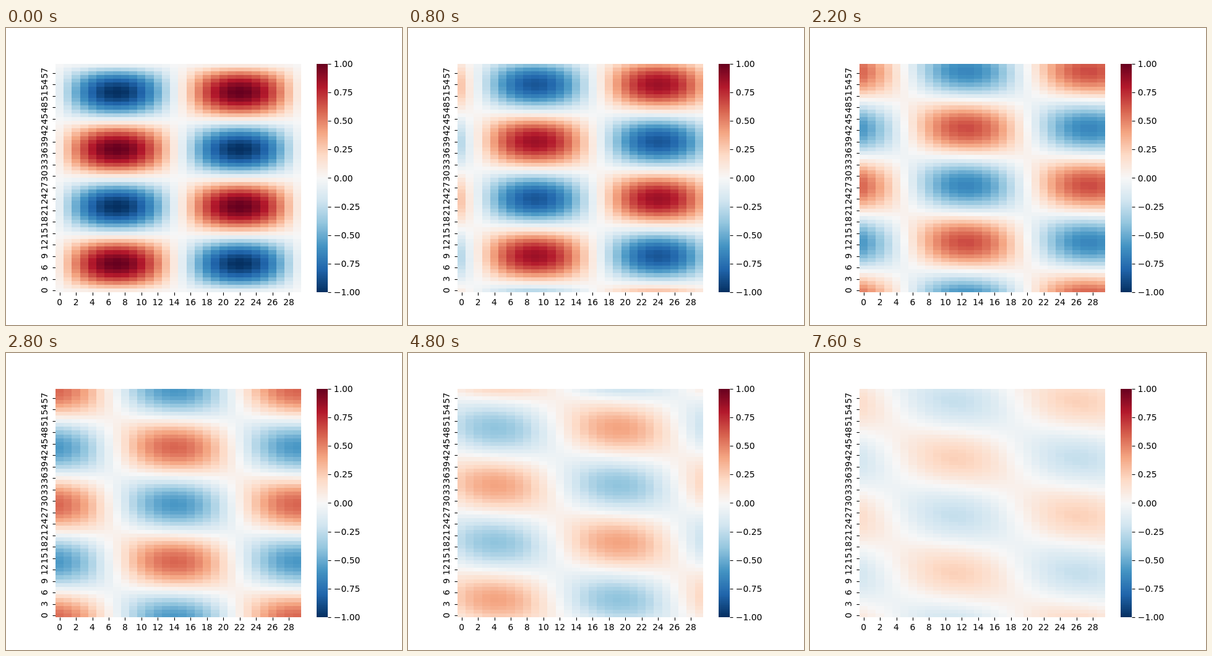
Write an HTML page with a canvas that moves like this. It is 640 px wide and 480 px high and loops after 8 s.

```html
<!DOCTYPE html>
<html lang="en">
<head>
<meta charset="utf-8">
<title>Advected wave heatmap</title>
<style>
html, body { margin: 0; width: 100%; height: 100%; overflow: hidden; background: #fff; }
canvas { display: block; }
</style>
</head>
<body>
<canvas id="stage" width="640" height="480"></canvas>
<script>
const ctx = document.getElementById('stage').getContext('2d');
const COLS = 30, ROWS = 60, LOOP = 8000;
const LEFT = 80, TOP = 57.6, WIDTH = 396.8, HEIGHT = 369.6, BOTTOM = TOP + HEIGHT;
const CELL_W = WIDTH / COLS, CELL_H = HEIGHT / ROWS;
const BAR_X = 502, BAR_W = 18;

// Diverging blue-white-red map, quantised to 256 levels
const STOPS = [0x053061, 0x2166ac, 0x4393c3, 0x92c5de, 0xd1e5f0, 0xf7f7f7,
  0xfddbc7, 0xf4a582, 0xd6604d, 0xb2182b, 0x67001f];
const PALETTE = Array.from({ length: 256 }, (_, i) => {
  const p = i / 25.5, a = Math.min(9, Math.floor(p)), f = p - a;
  const mix = shift => {
    const from = STOPS[a] >> shift & 255, to = STOPS[a + 1] >> shift & 255;
    return Math.round(from + (to - from) * f);
  };
  return `rgb(${mix(16)},${mix(8)},${mix(0)})`;
});
const color = v => PALETTE[Math.max(0, Math.min(255, Math.floor((v + 1) * 128)))];

function line(x1, y1, x2, y2) {
  ctx.beginPath();
  ctx.moveTo(x1, y1);
  ctx.lineTo(x2, y2);
  ctx.stroke();
}

function label(text, x, y, align, angle = 0) {
  ctx.save();
  ctx.translate(x, y);
  ctx.rotate(angle);
  ctx.textAlign = align;
  ctx.fillText(text, 0, 0);
  ctx.restore();
}

function drawAxes() {
  ctx.fillStyle = '#fff';
  ctx.fillRect(0, 0, 640, 480);
  for (let y = 58; y < 427; y++) {
    ctx.fillStyle = color(1 - 2 * (y + 0.5 - TOP) / HEIGHT);
    ctx.fillRect(BAR_X, y, BAR_W, 1);
  }
  ctx.fillStyle = ctx.strokeStyle = '#000';
  ctx.lineWidth = 1.11;
  ctx.font = '13.89px "DejaVu Sans", sans-serif';
  for (let i = 0; i < COLS; i += 2) {
    const x = LEFT + (i + 0.5) * CELL_W, tick = Math.round(x) + 0.5;
    line(tick, 427.5, tick, 432.5);
    label(i, x, 448, 'center');
  }
  for (let j = 0; j < ROWS; j += 3) {
    const y = BOTTOM - (j + 0.5) * CELL_H, tick = Math.round(y) + 0.5;
    line(75.5, tick, 80.5, tick);
    label(j, 67, y, 'center', -Math.PI / 2);
  }
  for (let i = 0; i <= 8; i++) {
    const v = 1 - i / 4, y = TOP + i * HEIGHT / 8, tick = Math.round(y) + 0.5;
    line(520.5, tick, 525.5, tick);
    label(v.toFixed(2).replace('-', '\u2212'), 529.8, Math.round(y + 5.2), 'left');
  }
}

// sin(kx)sin(ky) carried diagonally by a Lax-Friedrichs scheme, two substeps
// per step: each of its two diagonal modes has its own damping and phase.
const K = 2 * Math.PI / 30;
const DAMP_ACROSS = Math.cos(K) ** 2;
const DAMP_ALONG = Math.cos(K) ** 2 + 0.25 * Math.sin(K) ** 2;
const PHASE = 2 * Math.atan(0.5 * Math.tan(K));

function drawField(step) {
  const across = DAMP_ACROSS ** step / 2, along = DAMP_ALONG ** step / 2;
  for (let j = 0; j < ROWS; j++) {
    const y1 = Math.round(BOTTOM - (j + 1) * CELL_H), y2 = Math.round(BOTTOM - j * CELL_H);
    for (let i = 0; i < COLS; i++) {
      const x1 = Math.round(LEFT + i * CELL_W), x2 = Math.round(LEFT + (i + 1) * CELL_W);
      ctx.fillStyle = color(across * Math.cos(K * (i - j))
        - along * Math.cos(K * (i + j + 1) - PHASE * step));
      ctx.fillRect(x1, y1, x2 - x1, y2 - y1);
    }
  }
}

let shown = -1;
function frame() {
  let step = Math.floor(performance.now() % LOOP / 200);
  if (step > 32) step -= step % 2; // the faint tail moves at half rate
  if (step !== shown) {
    drawField(step);
    shown = step;
  }
  requestAnimationFrame(frame);
}

drawAxes();
frame();
</script>
</body>
</html>
```
